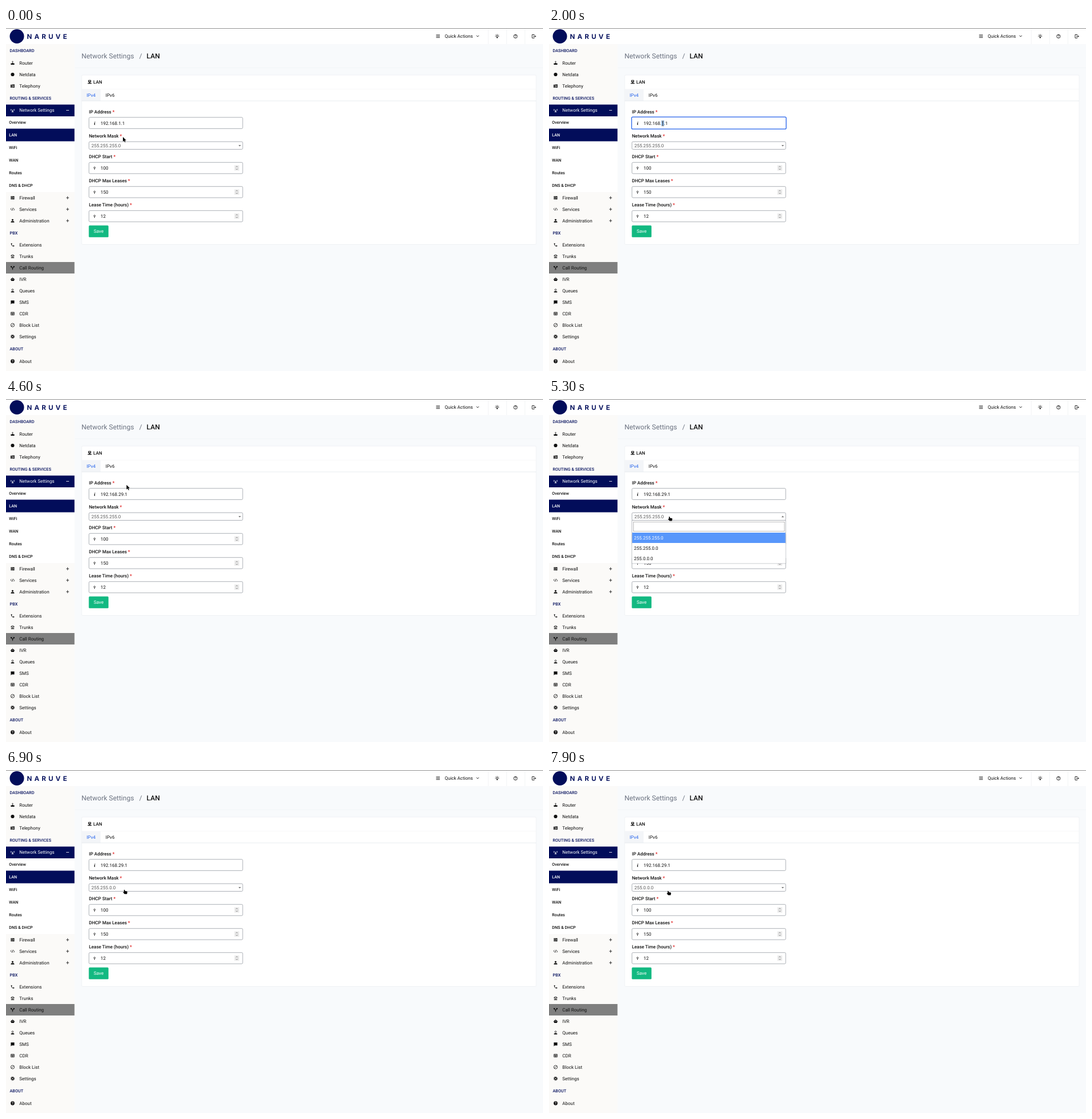
Recreate the animation shown at these times as an HTML page. Size 937x598 px, loop 8000 ms.

```html
<!DOCTYPE html>
<html lang="en">
<head>
<meta charset="utf-8">
<title>LAN settings</title>
<style>
html, body { margin: 0; width: 100%; height: 100%; overflow: hidden; background: #f8fafc; }
svg { display: block; width: 100%; height: 100%; }
text { font: 8px Roboto, sans-serif; fill: #111; white-space: pre; text-rendering: geometricPrecision; }
.m { font-weight: 500; }
.sub { font-size: 7.2px; font-weight: 500; }
.sec { font-size: 7.3px; font-weight: 500; fill: #0a1560; }
.big { font-size: 12px; }
.logo { font: 700 11.5px Inter, sans-serif; letter-spacing: 4.2px; fill: #0a1560; }
.tip { font: 6.5px Inter, sans-serif; fill: #91aeb5; }
.serif { font: italic 700 7.5px "Noto Serif", serif; }
.line { fill: none; stroke: #111; stroke-width: 2.6; }
</style>
</head>
<body>
<svg id="stage" viewBox="0 0 937 598" preserveAspectRatio="none"></svg>
<script>
const NAVY = '#020d5a', BLUE = '#2563eb', GREY = '#a3a7ae';
const MASKS = ['255.255.255.0', '255.255.0.0', '255.0.0.0'];

const rect = (x, y, w, h, fill, more = '') =>
  `<rect x="${x}" y="${y}" width="${w}" height="${h}" fill="${fill}" ${more}/>`;
// Text is placed by the middle of its capitals.
const text = (x, y, s, cls = '', more = '', half = 2.85) =>
  `<text x="${x}" y="${y + half}" class="${cls}" ${more}>${s}</text>`;
const path = (d, more = '') => `<path d="${d}" ${more}/>`;
const outline = (d, color = '#111', width = 1) =>
  path(d, `fill="none" stroke="${color}" stroke-width="${width}"`);
// Icons are drawn on a 24 unit grid around (x, y).
const icon = (x, y, body, size = 7.4) =>
  `<g transform="translate(${x - size / 2} ${y - size / 2}) scale(${size / 24})" fill="#111">${body}</g>`;
const line = (d, more = '') => path(d, 'class="line" ' + more);
const dot = (x, y, r, more = '') => `<circle cx="${x}" cy="${y}" r="${r}" ${more}/>`;
const ring = 'class="line"';
const question = color => outline('M8.500 9.500q0-3.500 3.500-3.500t3.500 3.200c0 2.500-3.500 2.600-3.500 5.300M12 16.500v2.500', color, 2.4);

const ICONS = {
  Router: path('M2 14h20v8H2zM10 9h4v6h-4zM8 5l4-4 4 4-2 2-2-2-2 2z'),
  Netdata: dot(12, 12, 10),
  Telephony: path('M1 5h6v17H1zM9 3h14v19H9z') + outline('M12 8h8M12 13h8M12 17h8', '#fff', 2),
  Firewall: rect(2, 3, 20, 18, '#111') + outline('M2 9h20M2 15h20M9 3v6M16 9v6M9 15v6', '#ddd', 1.6),
  Services: line('M8 18L2 12q-1-2 1-4l3-3M16 6l6 6q1 2-1 4l-3 3M8 18q4 2 4-6t4-6'),
  Administration: dot(12, 7, 5) + path('M2 22q0-8 10-8t10 8z'),
  Extensions: path('M6.600 10.800c1.400 2.800 3.800 5.100 6.600 6.600l2.200-2.200q.5-.5 1-.2 2 .6 4.600.6v5.400C10 22 3 14 3 3h5.500q0 2.500.6 4.600.2.600-.2 1z'),
  Trunks: path('M1 10Q3 3 12 3t11 7l-5 1-2-4H8l-2 4z') + line('M9 11l-5 10h16l-5-10') + dot(12, 16, 3),
  'Call Routing': line('M12 23v-8L4 5M12 15l8-10', 'style="stroke-width:4"') + path('M1 2h9L1 11zM23 2h-9l9 9z'),
  IVR: path('M11 1h2v5h-2zM4 6h16v5h3v6h-3v5H4v-5H1v-6h3z') + dot(8.500, 12, 2, 'fill="#fff"') + dot(15.500, 12, 2, 'fill="#fff"'),
  Queues: dot(12, 7, 4.500, ring) + path('M3 17q9-5 18 0v5H3z'),
  SMS: path('M2 2h20v17H7l-5 5z'),
  CDR: line('M3 4h18v16H3zM3 9h18M3 14h18M12 9v11'),
  'Block List': dot(12, 12, 10, ring) + line('M5 19L19 5'),
  Settings: dot(12, 12, 5.500, 'class="line" style="stroke-width:5"') +
    dot(12, 12, 9.500, 'class="line" stroke-dasharray="4 3.460" style="stroke-width:4"'),
  About: dot(12, 12, 11) + question('#fff')
};

function sidebar() {
  const items = { Router: 61, Netdata: 81, Telephony: 101, Firewall: 296, Services: 316, Administration: 336,
    About: 581 };
  ['Extensions', 'Trunks', 'Call Routing', 'IVR', 'Queues', 'SMS', 'CDR', 'Block List', 'Settings']
    .forEach((name, i) => items[name] = 378 + 20 * i);
  const sections = { DASHBOARD: 39.500, 'ROUTING &amp; SERVICES': 122, PBX: 357, ABOUT: 559.500 };
  const pages = ['Overview', 'LAN', 'WiFi', 'WAN', 'Routes', 'DNS &amp; DHCP'];
  let out = rect(0, 28, 119.500, 570, '#fbfaf8') + rect(0, 154, 119.500, 132, '#fff') +
    rect(0, 133.500, 119.500, 20.500, NAVY) + rect(0, 175.500, 119.500, 22, NAVY) +
    rect(0, 408, 119.500, 20, '#7f7f7f');
  for (const name in sections) out += text(6.500, sections[name], name, 'sec');
  for (const name in items) out += icon(11.500, items[name], ICONS[name]) + text(23.300, items[name], name);
  pages.forEach((name, i) => out += text(5.300, 164 + 22 * i, name, 'sub', name == 'LAN' ? 'style="fill:#fff"' : ''));
  for (const y of [296, 316, 336]) out += outline(`M105 ${y}h5M107.500 ${y - 2.500}v5`, '#111', .8);
  const tower = outline('M3 3q-3 5 0 10M21 3q3 5 0 10M7 5q-2 3 0 6M17 5q2 3 0 6M12 8v14M7 22l5-12 5 12M9 18h6', '#fff', 2);
  return out + icon(11.500, 144, tower) + text(23.300, 143.500, 'Network Settings', '', 'style="fill:#fff"') +
    outline('M105 143.500h5', '#fff', .8);
}

function header() {
  const bulb = dot(12, 11, 5, ring) + line('M9 18h6M10 21h4M12 0v3M1 11h3M20 11h3M4 3l2 2M20 3l-2 2');
  const exit = line('M14 7V3H3v18h11v-4M9 12h13M18 8l4 4-4 4');
  let out = rect(0, 0, 937, 28, '#fff') + rect(0, 0, 937, .8, '#777') +
    dot(19, 14.500, 12.500, `fill="${NAVY}"`) + text(36.500, 14.500, 'NARUVE', 'logo', '', 4.200) +
    outline('M750.500 12h6.500M750.500 14.300h6.500M750.500 16.600h6.500', '#111', .9) +
    text(765.500, 14.300, 'Quick Actions') + outline('M820.800 13l2.200 2.200 2.200-2.200', '#111', .9);
  for (const x of [841, 873, 905]) out += rect(x, 1, .7, 27, '#eef0f3');
  return out + icon(857, 14.500, bulb, 8) + icon(889, 14.500, dot(12, 12, 10, ring) + question('#111'), 7.600) +
    icon(921, 14.500, exit, 8);
}

const label = (y, s) =>
  text(144.700, y, s + ' <tspan style="fill:#e11d1d;font-weight:700"> *</tspan>'.replace('> *', '>*'), 'm');
const box = (y, h) => rect(144.800, y, 268.200, h, '#fff', `rx="1.800" stroke="${GREY}" stroke-width=".9"`);

function numberField(y, name, value) {
  return label(y - 20, name) + box(y - 9.700, 19.600) + dot(154.500, y - .5, 1.300, 'fill="none" stroke="#111" stroke-width=".8"') +
    outline(`M154.500 ${y + .8}v2.200`, '#111', .8) + text(165, y, value) +
    rect(398.500, y - 4.700, 8.500, 9.400, '#ececec') +
    outline(`M401 ${y - 1.300}l1.700-1.700 1.700 1.700M401 ${y + 1.300}l1.700 1.700 1.700-1.700`, '#666', .8);
}

function page() {
  const plug = path('M5 2h14v12H5zM10 14h4v4h-4zM2 18h20v4H2z') + rect(9, 5, 6, 5, '#fff');
  return rect(120, 69, 817, .6, '#eff2f5') +
    text(131.700, 49, 'Network Settings', 'big', 'style="fill:#6b7280"', 4.300) +
    text(232.500, 49, '/', 'big', 'style="fill:#6b7280"', 4.300) + text(245.300, 49, 'LAN', 'big m', '', 4.300) +
    rect(132, 82, 793, 295.500, '#fff', 'rx="2" stroke="#eceff3" stroke-width=".8"') +
    icon(146, 94, plug, 8) + text(152.300, 94, 'LAN', 'm') +
    rect(132, 106.500, 793, .6, '#f1f3f6') + rect(132, 107, 33, 20, '#f3f5f8') + rect(132, 126.700, 793, .7, '#dfe3e8') +
    text(140.700, 117, 'IPv4', '', `style="fill:${BLUE}"`) + text(173.800, 117, 'IPv6') +
    label(146, 'IP Address') + box(155.800, 19.600) + text(153.200, 166, 'i', 'serif') +
    label(188, 'Network Mask') + box(198.200, 13.300) +
    numberField(244, 'DHCP Start', 100) + numberField(286, 'DHCP Max Leases', 150) +
    numberField(328, 'Lease Time (hours)', 12) +
    rect(144.500, 344.200, 34.300, 20.600, '#12b981', 'rx="1.500"') +
    text(161.600, 354.500, 'Save', '', 'text-anchor="middle" style="fill:#fff"');
}

// Pointer path: time, x, y
const PATH = [
  [0, 204, 190], [900, 183, 168], [1000, 183, 168], [1200, 182.500, 167.500], [1300, 182.500, 167.500],
  [1600, 198.500, 166.500], [4000, 198.500, 166.500], [4400, 210.300, 149.700], [4800, 210.300, 149.700],
  [5300, 210, 205], [5500, 210, 205], [6100, 211, 255.500], [6400, 211, 255.500], [6900, 206.500, 208.700],
  [7000, 206.500, 209], [7300, 207, 276.500], [7400, 207, 277.500], [7500, 207, 277.500], [7900, 207.700, 210.700]
];

function pointerAt(t) {
  const i = PATH.findIndex(p => p[0] > t);
  if (i < 0) return PATH.at(-1).slice(1);
  const [t0, x0, y0] = PATH[i - 1], [t1, x1, y1] = PATH[i], k = (t - t0) / (t1 - t0);
  return [x0 + (x1 - x0) * k, y0 + (y1 - y0) * k];
}

function pointer(x, y, open) {
  const edge = 'stroke="#fff" stroke-width=".5" paint-order="stroke"';
  const hand = open || (y >= 198 && y <= 212);
  const beam = !hand && ((y > 155 && y < 176) || (y > 234 && y < 254));
  const bar = 'M-1.600-4.300q1.600 0 1.600 1v6.600q0 1-1.600 1M1.600-4.300q-1.600 0-1.600 1v6.600q0 1 1.600 1';
  const shape = beam ? outline(bar, '#fff', 1.500) + outline(bar, '#222', .7)
    : hand ? path('M-.7.200q.9-.7 1.500.4l.4 1.800 3.200.5q1 .300.800 1.500l-.6 3.100H.3l-2.500-3q0-1.200 1.500-.5z', edge)
    : path('M0 0v8l1.900-1.600 1.400 2.900 1.300-.6-1.400-2.800h2.600z', edge);
  return `<g transform="translate(${x} ${y})">${shape}</g>`;
}

function ipField(t) {
  const octet = t < 3200 ? '1' : t < 3500 ? '2' : '29';
  const focus = t >= 1900 && t < 4600;
  let out = '';
  if (focus) {
    out += rect(144.200, 155.200, 269.600, 21, '#fff', `rx="2" stroke="${BLUE}" stroke-width="1.300"`) +
      text(153.200, 166, 'i', 'serif');
    if (t >= 2000 && t < 3200) out += rect(196.200, 161.300, 4.600, 9.500, '#79aeea');
  }
  out += text(165, 166, `192.168.${octet}.1`);
  if (focus && (t < 2000 || t >= 3200)) out += rect(t < 3500 ? 200.700 : 205.200, 161.500, .6, 9, '#111');
  if (focus && t >= 3500)
    out += rect(144.700, 176.300, 268.500, 18.200, '#13191f', 'rx="2.500"') + text(148.300, 185.500, '192.168.29.1/24', 'tip', '', 2.300);
  return out;
}

function maskField(t, y, open) {
  const chosen = t < 6300 ? 0 : t < 7600 ? 1 : 2;
  const tip = open ? 'M405.600 206.200h4.400l-2.200-2.600z' : 'M405.600 204h4.400l-2.200 2.600z';
  let out = text(149, 205.300, MASKS[chosen], '', 'style="fill:#555"') + path(tip, 'fill="#777"');
  if (!open) return out;
  const hover = y < 233 ? chosen : Math.min(2, Math.floor((y - 233) / 18));
  out += rect(144.800, 211.500, 268.200, 75.300, '#fff', `stroke="${GREY}" stroke-width=".8"`) +
    rect(147.500, 214.300, 263.300, 16.400, '#fff', 'stroke="#aaa" stroke-width=".8"');
  MASKS.forEach((mask, i) => {
    const fill = i == hover ? '#5897fb' : i == chosen ? '#ddd' : '#fff';
    out += rect(145.200, 233 + 18 * i, 267.400, i < 2 ? 18 : 17.400, fill) +
      text(148.300, 242 + 18 * i, mask, '', i == hover ? 'style="fill:#fff"' : '');
  });
  return out;
}

const stage = document.getElementById('stage');
stage.innerHTML = page() + sidebar() + header() + '<g id="live"></g>';
const live = document.getElementById('live');
let shown = -1;

function draw(now) {
  const t = Math.floor(now % 8000 / 100) * 100;
  if (t != shown) {
    const [x, y] = pointerAt(t);
    const open = (t >= 5300 && t < 6300) || (t >= 7000 && t < 7600);
    live.innerHTML = ipField(t) + maskField(t, y, open) + pointer(x, y, open);
    shown = t;
  }
  requestAnimationFrame(draw);
}
const start = performance.now();
draw(0);
requestAnimationFrame(function begin() {
  shown = -1;
});
</script>
</body>
</html>
```
